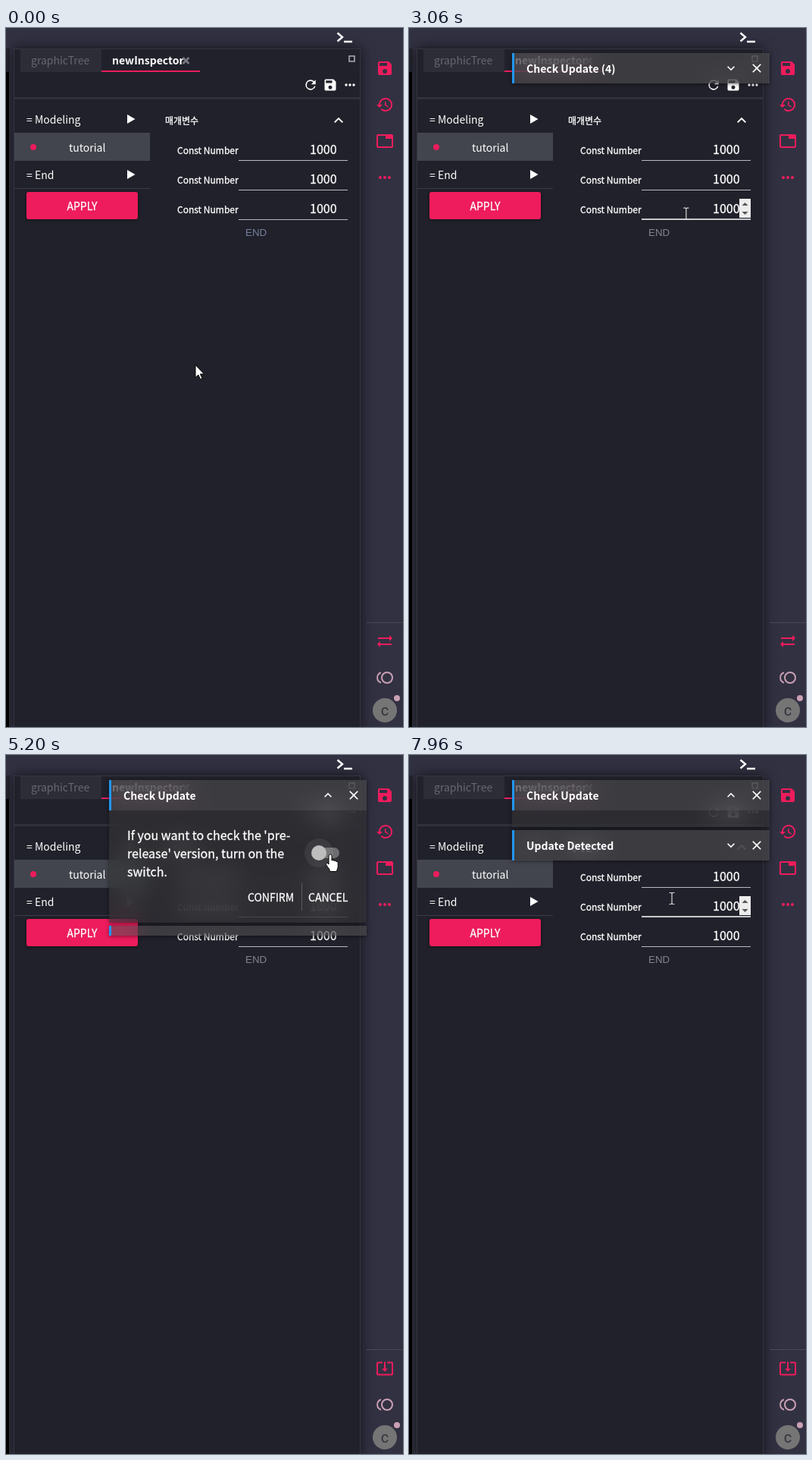
An HTML page that plays this animation: 524 by 921 pixels, repeating every 7990 ms.

```html
<!DOCTYPE html>
<html lang="en">
<head>
<meta charset="utf-8">
<style>
  html, body { margin: 0; width: 100%; height: 100%; overflow: hidden; background: #31303f; }
  #stage { position: relative; width: 524px; height: 921px; overflow: hidden; }
  svg { position: absolute; left: 0; top: 0; display: block; }
  text { font: 14px "Noto Sans CJK KR", "Noto Sans CJK", "Noto Sans", sans-serif; fill: #fff; white-space: pre; }
  .mid { stroke: #fff; stroke-width: .3; }
  .bold { font-weight: 700; }
  .small { font-size: 12px; }
  .big { font-size: 16px; }
  .note {
    position: absolute; left: 136px; width: 340px; overflow: hidden;
    background: rgba(54, 54, 54, .5); backdrop-filter: blur(15px);
    box-shadow: 0 1px 5px rgba(0, 0, 0, .45);
  }
</style>
</head>
<body>
<div id="stage">
  <svg id="base" width="524" height="921"></svg>
  <div class="note" id="first"><svg width="340" height="188"></svg></div>
  <div class="note" id="second"><svg width="340" height="40"></svg></div>
  <svg id="pointer" width="524" height="921">
    <g stroke="#000" fill="#fff" stroke-linejoin="round">
      <path id="arrow" d="M0 0V16.5L3.8 13L6.5 18.7L9 17.6L6.4 12H11.5Z"/>
      <path id="hand" d="M-2 2C-2-.7 2-.7 2 2V8C3-.2 2 7.2 5 8.6C6 7.8 7.6 8.2 8 9.6C9.2 9 10.2 10 10.2 11.4V15.5C10.2 18 9 19 8.6 22.5H-.6C-1-.4-1.2 20 -1 19.8C-2.6 17.6-4.4 15.6-5.6 13.2C-6 11.4-4.2 10.4-3 11.8L-2 13Z"/>
    </g>
    <path id="beam" fill="none" stroke="#d8d8d8" stroke-width="1.2" d="M-3.5-7.5H-1L0-6.5L1-7.5H3.5M0-6.5V6.5M-3.5 7.5H-1L0 6.5L1 7.5H3.5"/>
  </svg>
</div>
<script>
const LOOP = 7990, PINK = '#ee1c5c', MAUVE = '#c9a0b4';
const $ = id => document.getElementById(id);

const icons = {
  save: 'M17 3H5c-1.1 0-2 .9-2 2v14c0 1.1.9 2 2 2h14c1.1 0 2-.9 2-2V7l-4-4zm-5 16c-1.7 0-3-1.3-3-3s1.3-3 3-3 3 1.3 3 3-1.3 3-3 3zm3-10H5V5h10v4z',
  history: 'M13 3c-5 0-9 4-9 9H1l3.9 3.9.1.1L9 12H6c0-3.9 3.1-7 7-7s7 3.1 7 7-3.1 7-7 7c-1.9 0-3.7-.8-4.9-2.1l-1.5 1.5C8.3 20 10.5 21 13 21c5 0 9-4 9-9s-4-9-9-9zm-1 5v5l4.3 2.5.7-1.2-3.5-2.1V8z',
  tab: 'M21 3H3c-1.1 0-2 .9-2 2v14c0 1.1.9 2 2 2h18c1.1 0 2-.9 2-2V5c0-1.1-.9-2-2-2zm0 16H3V5h10v4h8z',
  more: 'M6 10a2 2 0 100 4 2 2 0 000-4zm12 0a2 2 0 100 4 2 2 0 000-4zm-6 0a2 2 0 100 4 2 2 0 000-4z',
  swap: 'M22 8l-4-4v3H3v2h15v3zM2 16l4 4v-3h15v-2H6v-3z',
  update: 'M12 16.5l4-4h-3v-9h-2v9H8zm9-13h-6v2h6v14H3v-14h6v-2H3c-1.1 0-2 .9-2 2v14c0 1.1.9 2 2 2h18c1.1 0 2-.9 2-2v-14c0-1.1-.9-2-2-2z',
  toll: 'M15 4a8 8 0 100 16 8 8 0 000-16zm0 14a6 6 0 110-12 6 6 0 010 12zM3 12c0-2.6 1.7-4.8 4-5.7V4.3a8 8 0 000 15.4v-2.1c-2.3-.8-4-3-4-5.6z',
  refresh: 'M17.65 6.35A8 8 0 1019.73 14h-2.08A6 6 0 1112 6c1.66 0 3.14.69 4.22 1.78L13 11h7V4z',
  up: 'M12 8l-6 6 1.4 1.4L12 10.8l4.6 4.6L18 14z',
  close: 'M19 6.4L17.6 5 12 10.6 6.4 5 5 6.4 10.6 12 5 17.6 6.4 19 12 13.4 17.6 19 19 17.6 13.4 12z'
};
const icon = (name, x, y, size = 24, fill = '#fff', id = '') =>
  `<g id="${id}" fill="${fill}" transform="translate(${x} ${y}) scale(${size / 24})"><path transform="translate(-12 -12)" d="${icons[name]}"/></g>`;
const rect = (x, y, w, h, fill, more = '') =>
  `<rect x="${x}" y="${y}" width="${w}" height="${h}" fill="${fill}" ${more}/>`;
const disc = (x, y, r, fill, more = '') => `<circle cx="${x}" cy="${y}" r="${r}" fill="${fill}" ${more}/>`;
const text = (x, y, str, cls = '', more = '') => `<text x="${x}" y="${y}" class="${cls}" ${more}>${str}</text>`;
const play = y => `<path fill="#fff" d="M160 ${y - 6}L170.5 ${y}L160 ${y + 6}Z"/>`;

const field = i => {
  const y = 39 * i;
  return text(226, y + 165.5, 'Const Number', 'small mid') +
    text(401, y + 166, '1000', 'big mid') +
    rect(307, y + 174, 144, 1, '#b9b9be') +
    `<g id="spin${i}">` + rect(307, y + 173, 144, 2, '#c8c8cc') + rect(436, y + 147, 15, 25, '#ececec') +
    `<path fill="#555" d="M439.5 ${y + 156}l4-4 4 4zm0 8l4 4 4-4z"/></g>`;
};

$('base').innerHTML =
  rect(0, 0, 524, 921, '#323142') +
  rect(0, 27, 5, 31, '#24242e') + rect(0, 58, 4, 863, '#000') + rect(4, 58, 2, 863, '#30303b') +
  rect(10, 27, 458, 900, '#353541', 'style="filter:drop-shadow(0 0 9px rgba(0,0,0,.65))"') +
  rect(11, 28, 456, 893, '#21212b') +
  rect(19, 28, 107, 30, '#2c2d36') + text(33, 48, 'graphicTree', '', 'style="fill:#666870"') +
  text(140, 48, 'newInspector', 'bold') +
  '<path d="M233.5 39l8 8m0-8l-8 8" stroke="#777980" stroke-width="2.6"/>' +
  rect(126, 56, 130, 2, PINK) +
  rect(453, 37, 7, 7, 'none', 'stroke="#a8a8ae" stroke-width="1.6"') +
  rect(11, 91, 456, 3, '#31313d') +
  icon('refresh', 402, 75, 20) + icon('save', 428, 75, 20) + icon('more', 454, 75, 20) +
  '<path d="M437.5 6.5l6.5 5.5-6.5 5.5M446 18h11" fill="none" stroke="#fff" stroke-width="2.4"/>' +
  text(27, 125.5, '= Modeling') + play(120) +
  rect(11, 138, 179, 37, '#42454d') + disc(36, 157, 4, PINK) + text(83, 162.5, 'tutorial') +
  text(27, 198.5, '= End') + play(193) + rect(11, 211, 179, 1, '#3b3b46') +
  rect(27, 216, 147, 36, PINK, 'rx="3" style="filter:drop-shadow(0 1px 2px rgba(0,0,0,.5))"') +
  text(100.5, 239.5, 'APPLY', 'mid', 'text-anchor="middle"') +
  text(210, 126.5, '매개변수', 'small mid') + icon('up', 439, 121.7) +
  [0, 1, 2].map(field).join('') +
  text(316, 274, 'END', '', 'id="end" style="font:13.33px \'Liberation Sans\',Arial,sans-serif"') +
  icon('save', 500, 53, 24, PINK) + icon('history', 500, 101, 24, PINK) +
  icon('tab', 500, 149, 24, PINK) + icon('more', 500, 197, 24, PINK) +
  rect(476, 783, 48, 1, '#484857') +
  disc(500, 808, 24, PINK, 'id="ripple"') +
  icon('swap', 500, 808, 24, PINK, 'swap') + icon('update', 500, 808, 24, PINK, 'update') +
  icon('toll', 500, 856, 24, MAUVE) +
  disc(500, 899, 16, '#757575') +
  text(500, 906, 'c', '', 'text-anchor="middle" style="font:20px Roboto,sans-serif;fill:#33333c"') +
  disc(516, 883, 4, MAUVE);

const header = (title, id) =>
  rect(0, 0, 340, 40, '#fff', 'fill-opacity=".08"') + rect(0, 0, 3, 40, '#2196f3') +
  text(19, 25.5, title, 'bold', `id="${id}Title"`) +
  icon('up', 289, 20, 20, '#fff', id + 'Chevron') + icon('close', 323, 20, 20);

$('first').firstChild.innerHTML =
  disc(288.5, 20, 17, '#fff', 'id="chevronHover"') + header('Check Update', 'first') +
  ["If you want to check the 'pre-", "release' version, turn on the", 'switch.']
    .map((line, i) => text(24, 78.5 + 24 * i, line, 'big mid')).join('') +
  rect(270, 89, 34, 14, '#6d6d70', 'rx="7" id="track"') +
  disc(0, 96, 19, '#fff', 'id="halo"') + disc(0, 96, 10, '#bdbdbd', 'id="thumb"') +
  text(183, 160, 'CONFIRM', 'mid') + text(263, 160, 'CANCEL', 'mid') + rect(254, 136, 1, 36, '#5a5a5e');
$('second').firstChild.innerHTML = header('Update Detected', 'second');

const clamp = v => Math.max(0, Math.min(1, v));
const mix = (a, b, p) => a + (b - a) * p;
const mixColor = (a, b, p) => `rgb(${a.map((v, i) => Math.round(mix(v, b[i], p)))})`;
const smooth = p => p * p * (3 - 2 * p);
const span = (t, start, length) => clamp((t - start) / length);

// cubic-bezier(.4, 0, .2, 1)
function standard(p) {
  let lo = 0, hi = 1, u = .5;
  for (let i = 0; i < 20; i++) {
    u = (lo + hi) / 2;
    const x = 1.2 * u * (1 - u) ** 2 + .6 * u * u * (1 - u) + u ** 3;
    if (x < p) lo = u; else hi = u;
  }
  return u * u * (3 - 2 * u);
}
const move = (t, start, length) => standard(span(t, start, length));
const pulse = (t, start, end) => span(t, start, 150) * (1 - span(t, end, 200));

// time, x, y
const route = [
  [0, 250, 444], [100, 250, 444], [480, 532, 742], [729, 532, 742], [730, 530, 821],
  [1120, 502, 813], [1690, 502, 813], [2460, 425, 532], [2840, 425, 532],
  [3100, 362, 226], [3630, 426, 53], [4570, 426, 53], [4950, 428, 131],
  [6670, 428, 131], [7240, 347, 189], [LOOP, 347, 189]
];
function position(t) {
  const i = route.findIndex(k => k[0] > t), a = route[i - 1], b = route[i];
  const p = smooth((t - a[0]) / (b[0] - a[0]));
  return [mix(a[1], b[1], p), mix(a[2], b[2], p)];
}

const show = (id, on) => $(id).style.display = on ? '' : 'none';
const set = (id, name, value) => $(id).setAttribute(name, value);

function render(t) {
  const open = move(t, 3720, 262) * (1 - move(t, 7812, 262));
  const h1 = 40 * move(t, 1320, 225) + 148 * open;
  const h2 = 40 * move(t, 5137, 225);
  const top2 = 37 + h1;
  $('first').style.cssText = `top:33px;height:${h1}px;display:${h1 > 0 ? 'block' : 'none'}`;
  $('second').style.cssText = `top:${top2}px;height:${h2}px;display:${h2 > 0 ? 'block' : 'none'}`;

  const count = t < 2350 ? ' (5)' : t < 3350 ? ' (4)' : t < 3700 ? ' (3)' : '';
  $('firstTitle').textContent = 'Check Update' + count;
  const flip = id => `translate(289 20) scale(.833 ${id})`;
  set('firstChevron', 'transform', flip(t < 3700 ? -.833 : .833));
  set('secondChevron', 'transform', flip(-.833));
  set('chevronHover', 'fill-opacity', .14 * pulse(t, 3480, 4600));

  const on = move(t, 5700, 150);
  set('thumb', 'cx', mix(277, 296.5, on));
  set('halo', 'cx', mix(277, 296.5, on));
  set('thumb', 'fill', mixColor([189, 189, 189], [207, 155, 181], on));
  set('track', 'fill', mixColor([109, 109, 112], [129, 96, 113], on));
  set('halo', 'fill-opacity', .07 * pulse(t, 4820, 6720) + .08 * pulse(t, 5650, 5900));

  set('ripple', 'r', mix(6, 24, move(t, 1270, 250)));
  set('ripple', 'fill-opacity', .2 * pulse(t, 1270, 1690));
  show('swap', t < 5140);
  show('update', t >= 5140);
  $('end').style.fill = t < 1300 ? '#75809c' : '#83838a';

  const [x, y] = position(t);
  const within = (l, tp, r, b) => x > l && x < r && y > tp && y < b;
  const noteEnd = h2 > 0 ? top2 + h2 : 33 + h1;
  const covered = h1 > 0 && within(136, 33, 476, noteEnd);
  const row = covered ? -1 : [0, 1, 2].findIndex(i => within(307, 147 + 39 * i, 451, 175 + 39 * i));
  const confirming = within(312, 169, 389, 205) && 33 + h1 > 205;
  const hand = within(480, 790, 522, 830) ||
    covered && (within(408, 36, 442, 72) || open > .5 && within(398, 112, 452, 147) || confirming);
  show('hand', hand);
  show('beam', !hand && row >= 0);
  show('arrow', !hand && row < 0);
  for (const i of [0, 1, 2]) show('spin' + i, row === i);
  for (const id of ['hand', 'beam', 'arrow']) set(id, 'transform', `translate(${x} ${y})`);
}

const begin = performance.now();
function tick() {
  render((performance.now() - begin) % LOOP);
  requestAnimationFrame(tick);
}
$('hand').setAttribute('d', 'M-2 2C-2-.7 2-.7 2 2V8C3 7 4.6 7.2 5 8.6C6 7.8 7.6 8.2 8 9.6C9.2 9 10.2 10 10.2 11.4V15.5C10.2 18 9 19 8.6 22.5H-.6C-.6 21-.8 20.2-1 19.8C-2.6 17.6-4.4 15.6-5.6 13.2C-6 11.4-4.2 10.4-3 11.8L-2 13Z');
tick();
</script>
</body>
</html>
```
